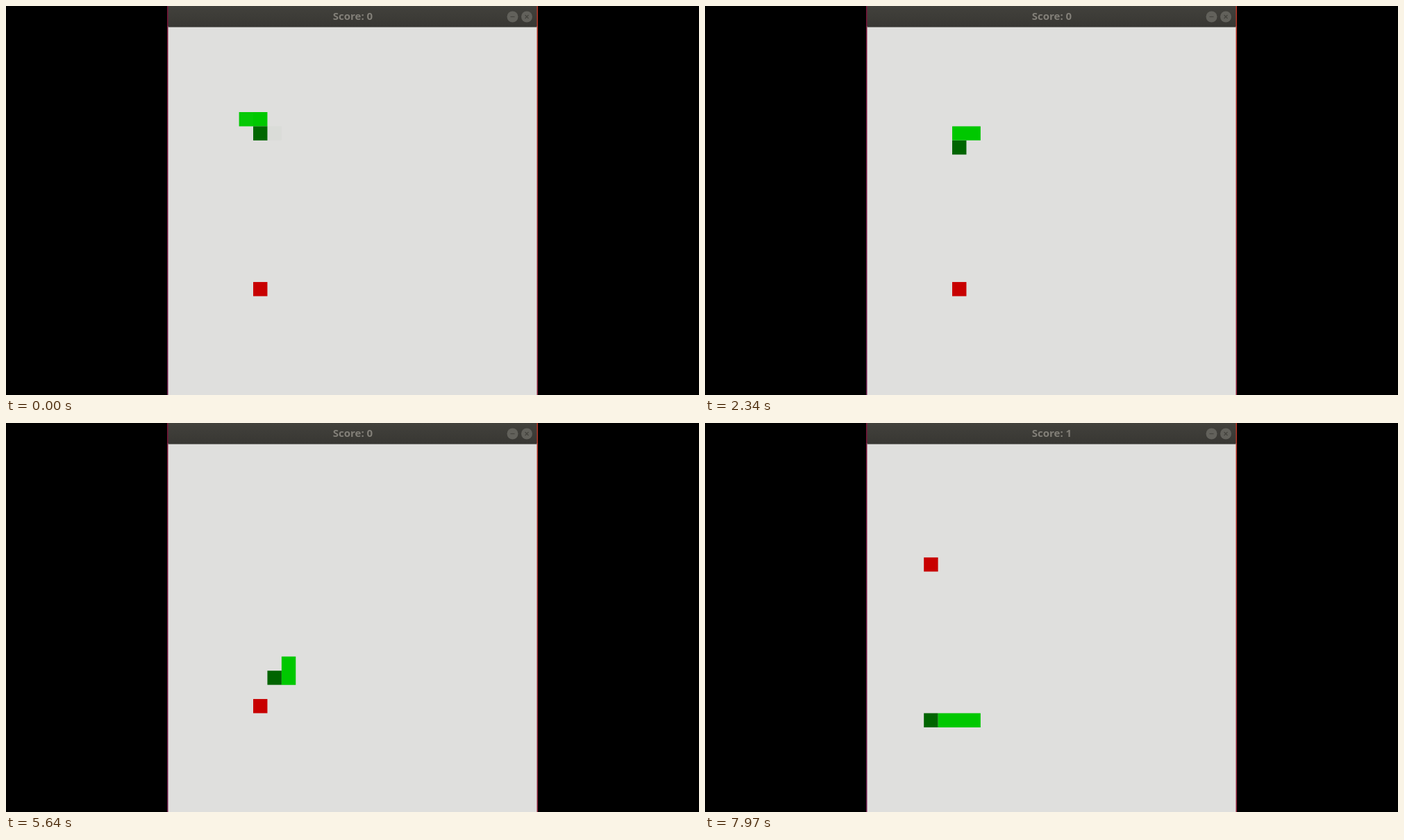
Recreate the animation shown at these times as an HTML page with a canvas. Size 998x561 px, loop 8000 ms.

```html
<!DOCTYPE html>
<html lang="en">
<head>
<meta charset="utf-8">
<title>Snake</title>
<style>
  html, body { margin: 0; width: 100%; height: 100%; overflow: hidden; background: #000; }
  canvas { display: block; }
</style>
</head>
<body>
<canvas id="stage" width="998" height="561"></canvas>
<script>
const ctx = document.getElementById('stage').getContext('2d');
const LOOP = 8000;
const STEP = 1000 / 7;   // seven moves per second
const SETTLE = 45;       // a move shows faintly at first, then snaps in
const CELL = 20.42, LEFT = 233.5, TOP = 30.5;
const BOARD = '#dfdfdd', HEAD = '#006400', BODY = '#00c800', FOOD = '#c80000';
const MEAL = 43;         // the move on which the food is eaten

const MOVES = { R: [1, 0], L: [-1, 0], U: [0, -1], D: [0, 1] };
const ROUTE = 'RD' + 'RRURRU' + 'RRDLDLLLLLDRRDLLDRDR' + 'DRDRDLU' + 'LLDDRDLDLD' + 'RDDR' + 'DRUULLLLL';
const trail = [[5, 6]];
for (const move of ROUTE) {
  const [x, y] = trail[trail.length - 1];
  const [dx, dy] = MOVES[move];
  trail.push([x + dx, y + dy]);
}
const headAt = step => trail[step + 2];
const lengthAt = step => step < MEAL ? 3 : 4;

function rect(color, x, y, w, h) {
  ctx.fillStyle = color;
  ctx.fillRect(x, y, w, h);
}

// One path for all cells, so that neighbours join without a seam.
function cells(list, color) {
  ctx.beginPath();
  for (const [col, row] of list) {
    ctx.rect(LEFT + col * CELL, TOP + row * CELL, CELL, CELL);
  }
  ctx.fillStyle = color;
  ctx.fill();
}

function shade(height, top, bottom) {
  const gradient = ctx.createLinearGradient(0, 0, 0, height);
  gradient.addColorStop(0, top);
  gradient.addColorStop(1, bottom);
  return gradient;
}

function line(x1, y1, x2, y2) {
  ctx.beginPath();
  ctx.moveTo(x1, y1);
  ctx.lineTo(x2, y2);
  ctx.stroke();
}

function button(x) {
  ctx.fillStyle = '#62615b';
  ctx.beginPath();
  ctx.arc(x, 15.5, 8, 0, Math.PI * 2);
  ctx.fill();
}

function drawWindow(score) {
  rect('#000', 0, 0, 998, 561);
  rect(shade(561, '#7a1238', '#6a1848'), 232, 0, 2, 561);
  rect(shade(561, '#b83222', '#8a2038'), 764, 0, 2, 561);
  rect(BOARD, LEFT, 29, 531, 532);
  rect(shade(TOP, '#42413c', '#383733'), LEFT, 0, 531, TOP);

  ctx.font = 'bold 15px "Open Sans", "Noto Sans", sans-serif';
  ctx.textAlign = 'center';
  ctx.fillStyle = '#827f78';
  ctx.fillText('Score: ' + score, 499.5, 20);

  button(729.5);
  button(750);
  ctx.strokeStyle = '#45443f';
  ctx.lineWidth = 1.2;
  line(726.5, 15.5, 732.5, 15.5);
  line(747.5, 13, 752.5, 18);
  line(752.5, 13, 747.5, 18);
}

function drawGame(step) {
  const eaten = step >= MEAL;
  drawWindow(eaten ? 1 : 0);
  cells([eaten ? [4, 8] : [6, 18]], FOOD);
  const head = step + 2;
  cells(trail.slice(head - lengthAt(step) + 1, head), BODY);
  cells([trail[head]], HEAD);
}

function drawFaintMove(step, alpha) {
  ctx.globalAlpha = alpha;
  if (step + 1 !== MEAL) cells([headAt(step - lengthAt(step) + 1)], BOARD);
  cells([headAt(step)], BODY);
  cells([headAt(step + 1)], HEAD);
  ctx.globalAlpha = 1;
}

function frame(now) {
  const time = now % LOOP;
  const step = Math.floor(time / STEP);
  const since = time - step * STEP;
  if (since >= SETTLE) {
    drawGame(step + 1);
  } else {
    drawGame(step);
    drawFaintMove(step, 0.02 + since * 0.0026);
  }
  requestAnimationFrame(frame);
}
requestAnimationFrame(frame);
</script>
</body>
</html>
```
